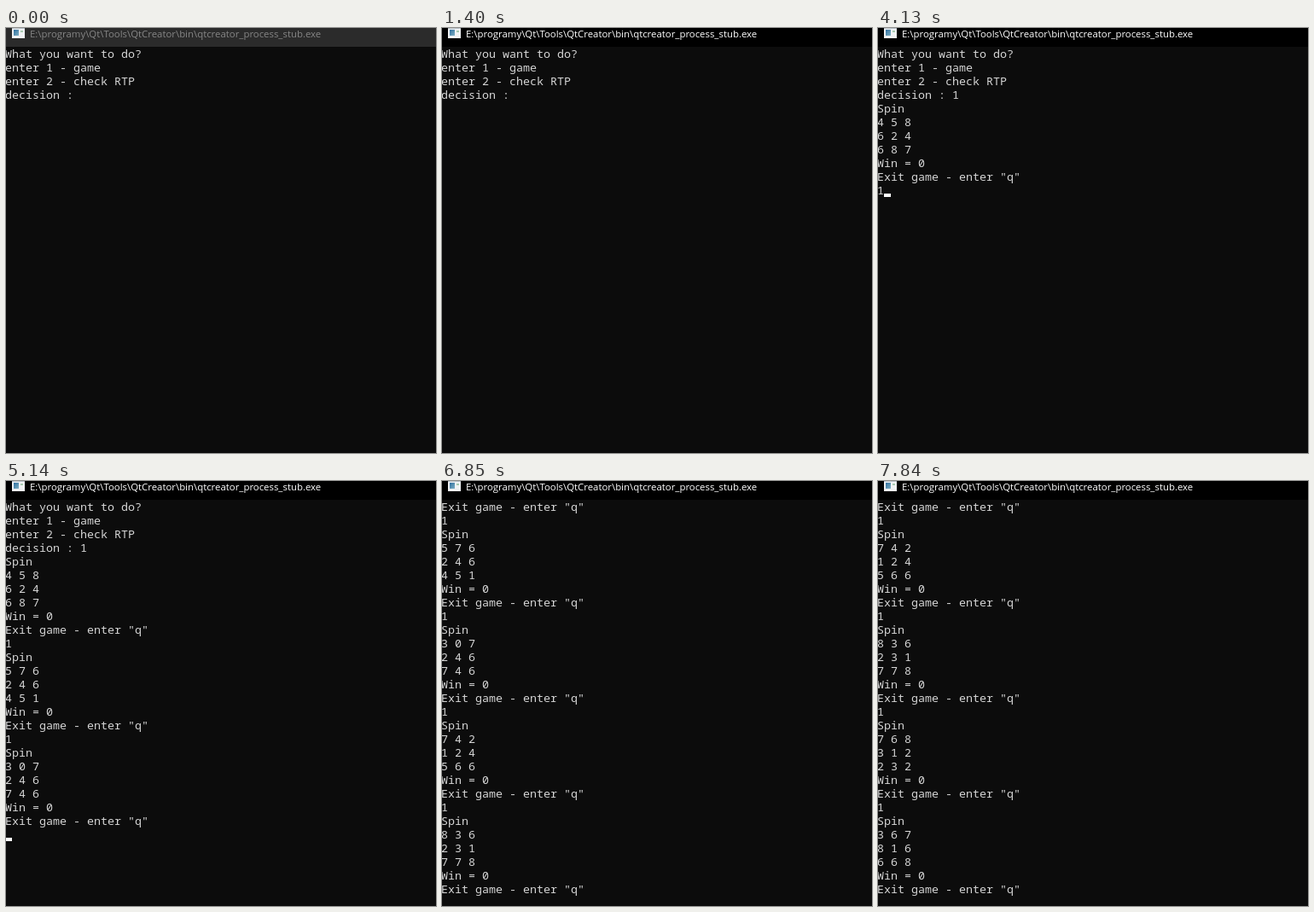
An HTML page for the animation above (8 s loop, 504 px wide and 498 px high).

```html
<!DOCTYPE html>
<html lang="en">
<head>
<meta charset="utf-8">
<title>Console slot game</title>
<style>
  html, body { margin: 0; width: 100%; height: 100%; overflow: hidden; background: #0c0c0c; }
  #stage { position: relative; width: 504px; height: 498px; overflow: hidden; background: #0c0c0c; }
  #bar {
    position: absolute; inset: 0 0 auto; height: 22px;
    background: #000; color: #fff;
    font: 500 11.4px/16px "Open Sans", "Noto Sans", sans-serif; white-space: pre;
  }
  #bar.idle { background: #2b2b2b; color: #868686; }
  #bar span { position: absolute; left: 28px; top: -1px; }
  #bar svg { position: absolute; left: 7px; top: 0; }
  #screen { position: absolute; inset: 22px 0 0; overflow: hidden; }
  #text {
    position: absolute; left: -1px; top: 0; margin: 0; color: #d6d6d6;
    font: 13.333px/16px "Noto Sans Mono", "DejaVu Sans Mono", monospace;
    font-variant-ligatures: none;
  }
  #cursor { position: absolute; width: 8px; height: 4px; background: #fff; }
</style>
</head>
<body>
<div id="stage">
  <div id="bar">
    <svg width="15" height="13">
      <defs>
        <linearGradient id="pane" x2="1" y2="1">
          <stop stop-color="#2f6f9f"/>
          <stop offset="1" stop-color="#7fb0c4"/>
        </linearGradient>
      </defs>
      <rect width="15" height="12" fill="#f0f2f4"/>
      <rect width="15" height="1" fill="#b4bdc4"/>
      <rect x="2" y="2" width="6" height="7" fill="url(#pane)"/>
      <rect x="10" y="3" width="3" height="2" fill="#a9cbb0"/>
    </svg>
    <span>E:\programy\Qt\Tools\QtCreator\bin\qtcreator_process_stub.exe</span>
  </div>
  <div id="screen">
    <pre id="text"></pre>
    <div id="cursor"></div>
  </div>
</div>
<script>
  const LOOP = 8000, FOCUS = 380, ROWS = 30, CELL_W = 8, CELL_H = 16;
  const [bar, text, cursor] = ['bar', 'text', 'cursor'].map(id => document.getElementById(id));

  const menu = 'What you want to do?\nenter 1 - game\nenter 2 - check RTP\ndecision : ';
  const spin = reels => 'Spin\n' + reels.split(' ').map(row => [...row].join(' ')).join('\n') +
    '\nWin = 0\nExit game - enter "q"\n';

  // [time in ms, appended output, cursor visible]
  const steps = [
    [0, menu, 0], [850, '', 1], [1400, '', 0], [1930, '', 1], [2500, '', 0],
    [2800, '1', 1], [2970, '\n' + spin('458 624 687'), 1],
    [3500, '', 0], [4050, '', 1],
    [4130, '1', 1], [4280, '\n' + spin('576 246 451'), 1],
    [4910, '1', 1], [5140, '\n' + spin('307 246 746'), 1],
    [5840, '1', 1], [6070, '\n' + spin('742 124 566'), 1],
    [6680, '1', 1], [6850, '\n' + spin('836 231 778'), 1],
    [7150, '1', 1], [7310, '\n', 1], [7380, spin('768 312 232'), 1],
    [7610, '1', 1], [7840, '\n' + spin('367 816 668'), 1]
  ];

  let shown = -1;
  function show(count) {
    if (count === shown) return;
    shown = count;
    const lines = steps.slice(0, count).map(s => s[1]).join('').split('\n');
    const view = lines.slice(-ROWS);
    const row = view.length - 1;
    text.textContent = view.join('\n');
    cursor.style.left = view[row].length * CELL_W - 1 + 'px';
    cursor.style.top = (row + 1) * CELL_H - 4 + 'px';
    cursor.style.visibility = steps[count - 1][2] ? 'visible' : 'hidden';
  }

  const start = performance.now();
  function tick() {
    const t = (performance.now() - start) % LOOP;
    bar.classList.toggle('idle', t < FOCUS);
    show(steps.filter(s => s[0] <= t).length);
    requestAnimationFrame(tick);
  }
  tick();
</script>
</body>
</html>
```
